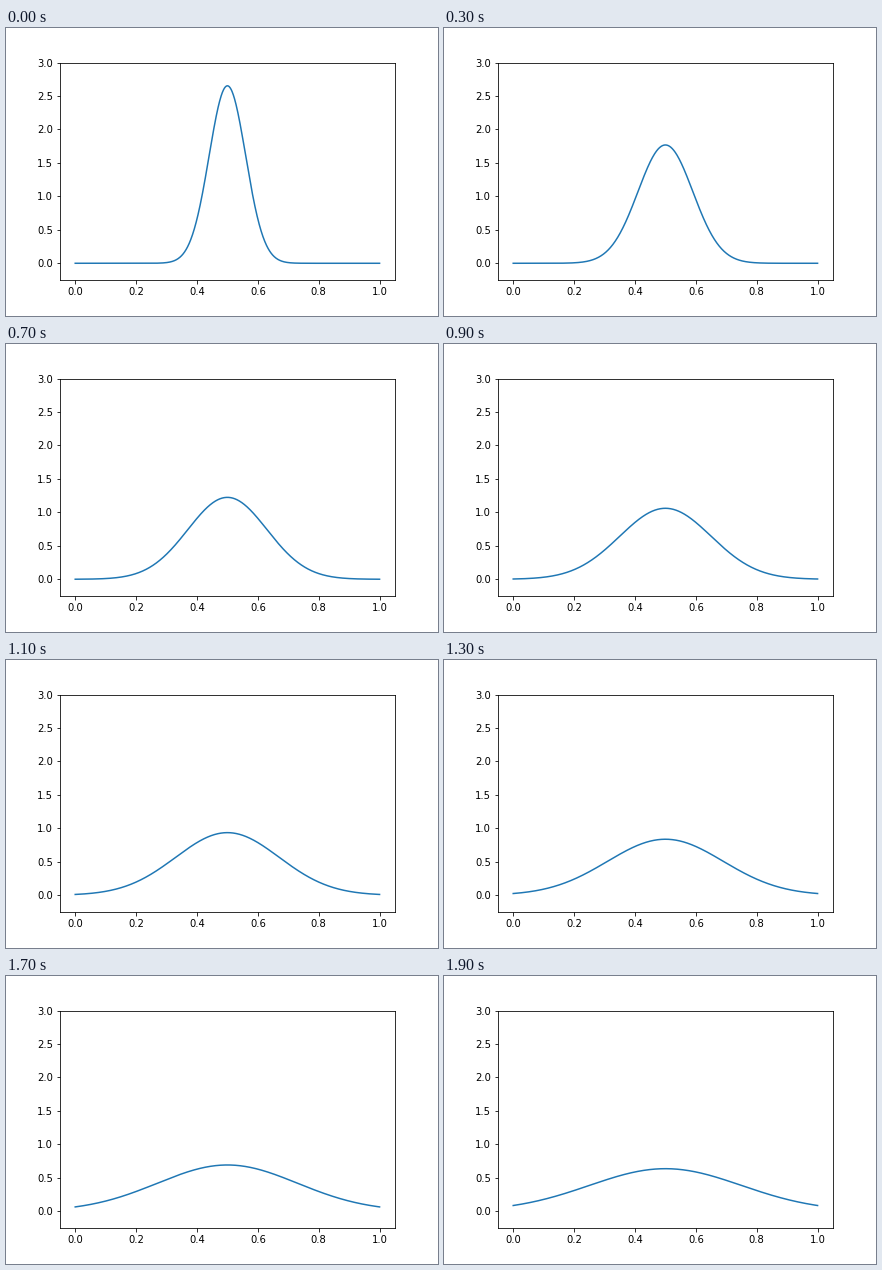
These frames come from a looping animation (432x288 px, 2 s). A matplotlib script:

```python
import numpy as np
import matplotlib.pyplot as plt
from matplotlib.animation import FuncAnimation

FRAMES = 20
INTERVAL = 100

plt.rcParams["font.family"] = "DejaVu Sans"
plt.rcParams["font.size"] = 10

fig, ax = plt.subplots(figsize=(6, 4), dpi=72)
fig.subplots_adjust(left=0.125, right=0.9, bottom=0.125, top=0.88)

x = np.linspace(0, 1, 1000)


def bell(sigma):
    return np.exp(-0.5 * ((x - 0.5) / sigma) ** 2) / (2 * np.pi * sigma)


line, = ax.plot(x, bell(0.06), color="#1f77b4", lw=1.5)
ax.set_xlim(-0.05, 1.05)
ax.set_ylim(-0.25, 3)
ax.set_xticks(np.arange(6) * 0.2)
ax.set_yticks(np.arange(7) * 0.5)


def update(frame):
    # the spread grows linearly while the area stays constant
    line.set_ydata(bell(0.06 + 0.01 * frame))
    return line,


anim = FuncAnimation(fig, update, frames=FRAMES, interval=INTERVAL,
                     repeat=True, repeat_delay=0)
plt.show()
```
